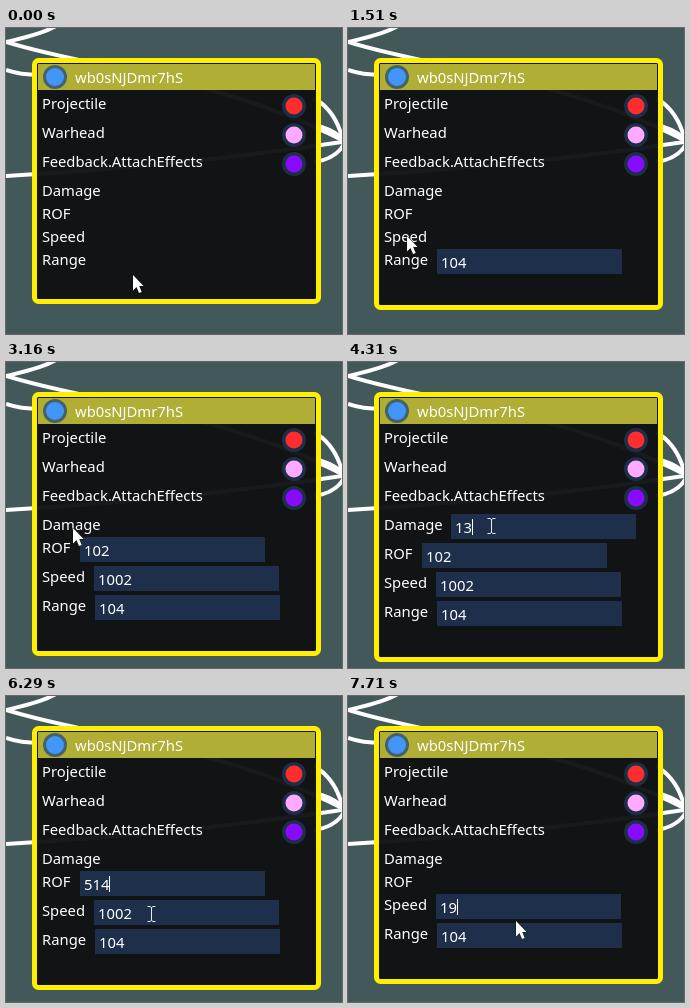
These frames come from a looping animation (336 px wide and 306 px high, 8000 ms). An HTML page with a canvas:

```html
<!DOCTYPE html>
<html lang="en">
<head>
<meta charset="utf-8">
<title>Node editor</title>
<style>
  html, body { margin: 0; width: 100%; height: 100%; overflow: hidden; background: #435859; }
  canvas { display: block; }
</style>
</head>
<body>
<canvas width="336" height="306"></canvas>
<script>
const ctx = document.querySelector('canvas').getContext('2d');
const LOOP = 8000, STEP = 60;

const WIRES = [
  'M50 -2C34 7 16 10 0 14C90 42 210 48 336 112',
  'M0 42Q14 47 34 47',
  'M0 148C120 141 230 130 336 114',
  'M308 70C325 80 332 94 336 109',
  'M308 97Q327 101 338 112',
  'M308 134Q330 131 338 116',
].map(d => new Path2D(d));

const PINS = [['Projectile', '#ff2d2d'], ['Warhead', '#ffaaff'], ['Feedback.AttachEffects', '#870cff']];
const ROWS = [['Damage', 103], ['ROF', 74], ['Speed', 88], ['Range', 89]];

// time, row, text (null closes the field), typed by the user
const EDITS = [
  [970, 'Range', '104'],
  [1790, 'Speed', '1002'],
  [2520, 'ROF', '102'],
  [3620, 'Damage', '101'],
  [4000, 'Damage', '1', true],
  [4310, 'Damage', '13', true],
  [5400, 'Damage', null],
  [5400, 'ROF', '5', true],
  [5760, 'ROF', '51', true],
  [5830, 'ROF', '514', true],
  [6700, 'ROF', null],
  [6700, 'Speed', '1', true],
  [7710, 'Speed', '19', true],
];

// start, end, x, y, pointer shape
const MOVES = [
  [60, 630, 61, 232, 'arrow'],
  [1150, 1510, 59, 208, 'arrow'],
  [1850, 2180, 57, 185, 'arrow'],
  [2700, 3160, 67, 166, 'arrow'],
  [3680, 4000, 143, 164, 'beam'],
  [4370, 4800, 166, 195, 'beam'],
  [4860, 5100, 94, 195, 'beam'],
  [5190, 5340, 40, 195, 'beam'],
  [5400, 5610, 33, 173, 'arrow'],
  [5900, 6290, 145, 218, 'beam'],
  [6440, 6700, 14, 213, 'beam'],
  [6760, 7090, 170, 224, 'arrow'],
  [7340, 7340, 168, 225, 'arrow'],
];

const POINTERS = {
  arrow: new Path2D('M0 0V15.5L3.5 12L6 18L8.7 17L6.2 11H10.5Z'),
  beam: new Path2D('M-3.5 -7.5H-1L.5 -6.5L2 -7.5H4.5M.5 -6.5V6.5M-3.5 7.5H-1L.5 6.5L2 7.5H4.5'),
};

function fieldsAt(time) {
  const values = {};
  let caret = null;
  for (const [at, row, text, typed] of EDITS) {
    if (at > time) break;
    if (text === null) delete values[row];
    else values[row] = text;
    caret = typed ? row : null;
  }
  return { values, caret };
}

function pointerAt(time) {
  let x = 127, y = 247, shape = 'arrow';
  for (const [start, end, toX, toY, toShape] of MOVES) {
    if (time < start) break;
    const steps = Math.round((end - start) / STEP) + 1;
    const done = time >= end ? steps : Math.floor((time - start) / (end - start) * (steps - 1)) + 1;
    const p = done / steps, eased = p * p * (3 - 2 * p);
    x += (toX - x) * eased;
    y += (toY - y) * eased;
    shape = toShape;
  }
  return { x: Math.round(x), y: Math.round(y), shape };
}

function rect(x, y, w, h, color) {
  ctx.fillStyle = color;
  ctx.fillRect(x, y, w, h);
}

function box(x, y, w, h, radius, color) {
  ctx.fillStyle = color;
  ctx.beginPath();
  ctx.roundRect(x, y, w, h, radius);
  ctx.fill();
}

function dot(x, y, r, color) {
  ctx.fillStyle = color;
  ctx.beginPath();
  ctx.arc(x, y, r, 0, Math.PI * 2);
  ctx.fill();
}

function pin(x, y, r, color, ring) {
  dot(x, y, 12, ring);
  dot(x, y, r, color);
}

function label(text, x, y) {
  ctx.fillStyle = '#fff';
  ctx.fillText(text, x, y);
}

function drawPanel(height) {
  box(28, 32, 285, height - 4, 4, 'rgba(16,17,18,.96)');
  rect(32, 36, 277, 26, '#b0ae34');
  ctx.strokeStyle = '#ffee00';
  ctx.lineWidth = 5;
  ctx.beginPath();
  ctx.roundRect(28.5, 32.5, 284, height - 5, 4);
  ctx.stroke();
  pin(49, 49, 9, '#4296fa', '#45616a');
  label('wb0sNJDmr7hS', 69, 55);
  PINS.forEach(([name, color], i) => {
    label(name, 36, 81 + 29 * i);
    pin(288, 78 + 29 * i, 8.5, color, '#1d2f47');
  });
}

function drawRows({ values, caret }) {
  let y = 168;
  for (const [name, x] of ROWS) {
    const value = values[name];
    label(name, 36, y);
    if (value !== undefined) {
      rect(x, y - 16, 185, 25, '#1d2f4a');
      label(value, x + 4, y + 3);
      if (caret === name) {
        rect(Math.round(x + 4 + ctx.measureText(value).width), y - 11, 1, 16, '#fff');
      }
    }
    y += value === undefined ? 23 : 29;
  }
}

function drawPointer({ x, y, shape }) {
  ctx.save();
  ctx.translate(x, y);
  ctx.lineWidth = 1;
  if (shape === 'arrow') {
    ctx.strokeStyle = '#111';
    ctx.stroke(POINTERS.arrow);
    ctx.fillStyle = '#fff';
    ctx.fill(POINTERS.arrow);
  } else {
    ctx.strokeStyle = '#e8ecf0';
    ctx.stroke(POINTERS.beam);
  }
  ctx.restore();
}

function draw(time) {
  rect(0, 0, 336, 306, '#435859');
  ctx.font = '14.8px "Noto Sans", "Open Sans", sans-serif';
  ctx.strokeStyle = '#fff';
  ctx.lineWidth = 4;
  WIRES.forEach(wire => ctx.stroke(wire));
  // The panel grows one step after its rows do.
  const openCount = Object.keys(fieldsAt(time - STEP).values).length;
  drawPanel(246 + 6 * openCount);
  drawRows(fieldsAt(time));
  drawPointer(pointerAt(time));
}

const begin = performance.now();
function tick() {
  draw((performance.now() - begin) % LOOP);
  requestAnimationFrame(tick);
}
tick();
</script>
</body>
</html>
```
